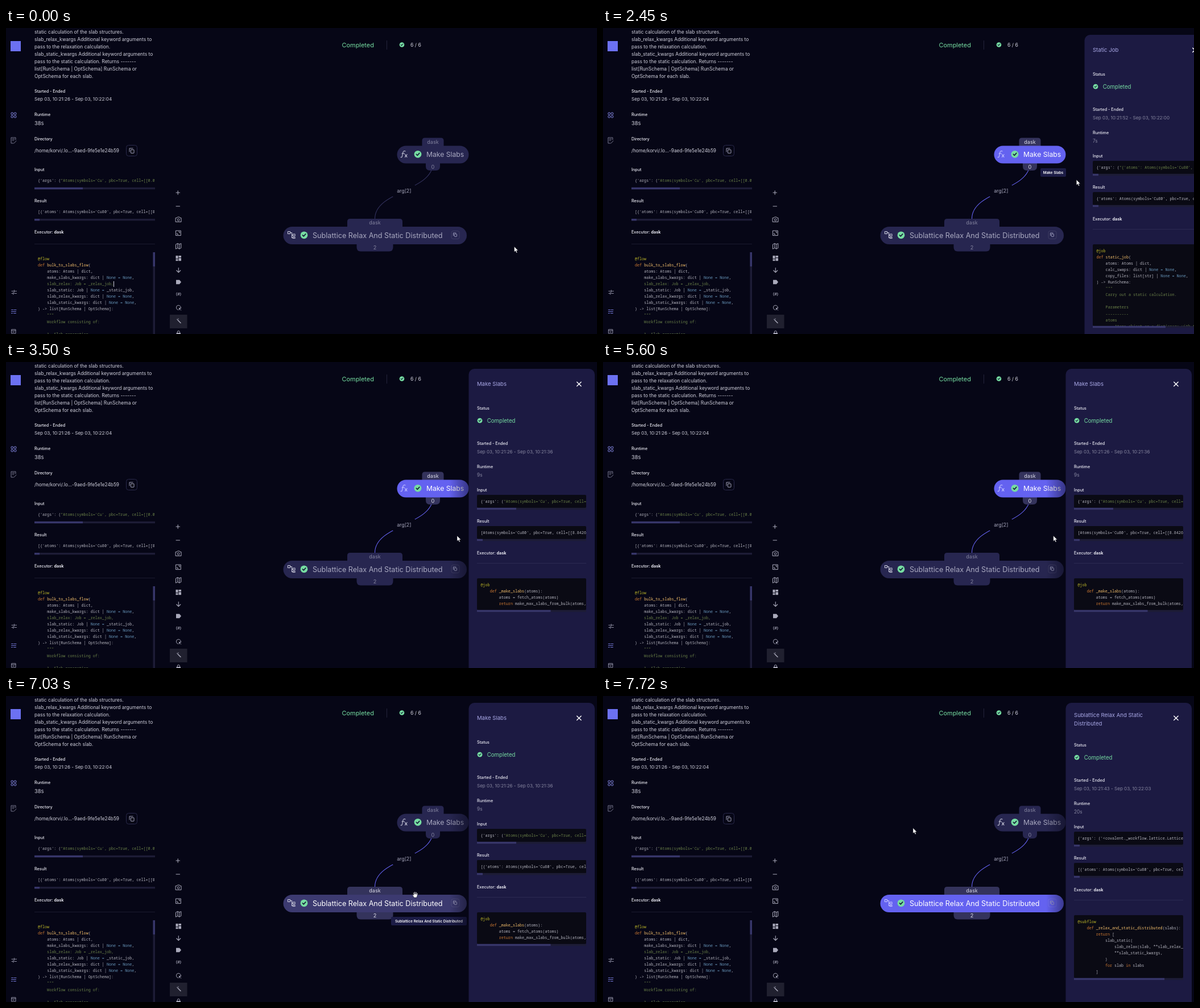
Write an HTML page that moves like this. It is 1039x539 px and loops after 8 s.

```html
<!DOCTYPE html>
<html lang="en">
<head>
<meta charset="utf-8">
<title>Workflow graph</title>
<style>
html, body { margin: 0; width: 100%; height: 100%; overflow: hidden; background: #060616; }
#stage { display: block; position: absolute; left: 0; top: 0; }
text { font-family: Inter, "Open Sans", sans-serif; white-space: pre; }
.mono { font-family: "Noto Sans Mono", "DejaVu Sans Mono", monospace; font-size: 6.73px; }
.line { fill: none; stroke-linecap: round; stroke-linejoin: round; }
</style>
</head>
<body>
<svg id="stage" width="1039" height="539" viewBox="0 0 1039 539"></svg>
<script>
const LOOP = 8000;
const stage = document.getElementById('stage');
const INK = { head: '#eeeef6', body: '#d0d0dc', soft: '#86869f', green: '#76dda2', code: '#b4b4be',
  meta: '#bbb529', key: '#cc7832', name: '#f5c06c', value: '#6897bb', string: '#6a8048' };

function add(parent, tag, attrs, content) {
  const el = document.createElementNS('http://www.w3.org/2000/svg', tag);
  for (const k in attrs) el.setAttribute(k, attrs[k]);
  if (content !== undefined) el.textContent = content;
  return parent.appendChild(el);
}
const group = (parent, attrs = {}) => add(parent, 'g', attrs);
const rect = (parent, x, y, width, height, fill, rx = 0) =>
  add(parent, 'rect', { x, y, width, height, fill, rx });
const path = (parent, d, fill) => add(parent, 'path', { d, fill });
const line = (parent, d, stroke, width = 1) =>
  add(parent, 'path', { d, stroke, 'stroke-width': width, class: 'line' });
const show = (el, on) => el.setAttribute('visibility', on ? 'visible' : 'hidden');
const clipBox = (parent, x, y, width, height) =>
  add(parent, 'svg', { x, y, width, height, overflow: 'hidden' });

// y is the middle of the capitals
function label(parent, x, y, size, str, fill = INK.body, weight = 400, anchor = 'start') {
  return add(parent, 'text', { x, y: y + size * 0.36, 'font-size': size + 'px', fill,
    'font-weight': weight, 'text-anchor': anchor }, str);
}

const TOKENS = [
  ['meta', /^@\w+/], ['string', /^".*/], ['key', /^\b(def|return|for|in)\b/],
  ['value', /^None( =( None)?)?/], ['code', /^(\w+|[^\w"@]+|.)/]
];
function codeLine(parent, x, y, str) {
  const text = add(parent, 'text', { x, y: y + 2.4, class: 'mono', fill: INK.code });
  if (str[0] === '~') {
    add(text, 'tspan', { fill: INK.string }, str.slice(1));
    return;
  }
  let afterDef = false;
  while (str) {
    const [kind, re] = TOKENS.find(([, r]) => r.test(str));
    const word = str.match(re)[0];
    const isName = afterDef && /\w/.test(word);
    add(text, 'tspan', { fill: INK[isName ? 'name' : kind] }, word);
    if (word === 'def') afterDef = true;
    else if (isName) afterDef = false;
    str = str.slice(word.length);
  }
}
const code = (parent, x, y, src) =>
  src.split('\n').forEach((s, i) => s && codeLine(parent, x, y + i * 11.04, s));

function check(parent, x, y, r) {
  add(parent, 'circle', { cx: x, cy: y, r, fill: INK.green });
  line(parent, `M${x - r * .42} ${y}l${r * .3} ${r * .32}l${r * .56} ${-r * .62}`, '#16203a', r * .26);
}
function scrollBar(parent, x, y, width, thumb) {
  rect(parent, x, y, width, 3.4, '#1d1c36');
  rect(parent, x, y, thumb, 3.4, '#37366a');
}
function copyIcon(parent, x, y, s, color) {
  line(parent, `M${x - s} ${y + s * .5}v${-s * 1.5}h${s * 1.5}`, color, .9);
  add(parent, 'rect', { x: x - s * .4, y: y - s * .4, width: s * 1.4, height: s * 1.5,
    rx: .6, fill: 'none', stroke: color, 'stroke-width': .9 });
}

// side navigation
const nav = group(stage);
rect(nav, 8, 23, 18, 18, '#6c71f2');
for (const [x, y] of [[9, 149], [14.3, 149], [9, 154.3], [14.3, 154.3]])
  add(nav, 'rect', { x, y, width: 3.6, height: 3.6, rx: 1.2, fill: 'none', stroke: '#8b8fee' });
line(nav, 'M13 203h-4v-10h8v4M11 195.500h4M11 198h3M14 203l4-4', '#77778e');
line(nav, 'M10 463.500h3M16 463.500h2.500M10 467.500h1.500M14.500 467.500h4', '#8d8da2');
line(nav, 'M14.500 462v3M12.800 466v3', '#8d8da2', 1.3);
line(nav, 'M9.500 496.500h3M14 496.500h4M9.500 499.500h8M9.500 502.500h2M13.500 502.500h4', '#7478d8');
line(nav, 'M10 531h7v7h-7zM10 533h7M12 535.500h2', '#8d8da2');

// left details
const side = clipBox(stage, 0, 0, 262, 539);
['static calculation of the slab structures.', 'slab_relax_kwargs Additional keyword arguments to',
  'pass to the relaxation calculation.', 'slab_static_kwargs Additional keyword arguments to',
  'pass to the static calculation. Returns -------', 'list[RunSchema | OptSchema] RunSchema or',
  'OptSchema for each slab.'].forEach((s, i) => label(side, 50, 7.2 + i * 12.9, 8.45, s));
const heading = (parent, x, y, str) => label(parent, x, y, 7.2, str, INK.head, 500);
function executor(parent, x, y) {
  const t = heading(parent, x, y, 'Executor: ');
  add(t, 'tspan', { 'font-weight': 700 }, 'dask');
}
heading(side, 50, 111.3, 'Started - Ended');
label(side, 50, 125.5, 8.1, 'Sep 03, 10:21:26 - Sep 03, 10:22:04');
heading(side, 50, 152.5, 'Runtime');
label(side, 50, 168, 9.4, '38s');
heading(side, 50, 195.3, 'Directory');
label(side, 50, 216, 8.25, '/home/korvi/.lo...-9aed-9fe5e1e24b59');
add(side, 'rect', { x: 211.5, y: 206.5, width: 19, height: 19, rx: 4, fill: 'none', stroke: '#29294a' });
copyIcon(side, 221, 216, 4, '#b6b6c8');
heading(side, 50, 249.3, 'Input');
codeLine(side, 56, 269, `{'args': ("Atoms(symbols='Cu', pbc=True, cell=[[0.0, 1.8`);
scrollBar(side, 50, 280.8, 212, 85);
heading(side, 50, 304.5, 'Result');
codeLine(side, 56, 324, `[{'atoms': Atoms(symbols='Cu80', pbc=True, cell=[[8.84`);
scrollBar(side, 50, 336, 212, 9);
executor(side, 50, 359.5);
rect(side, 50, 380, 212, 1, '#1a1a2e');
code(side, 56, 406.7, `@flow
def bulk_to_slabs_flow(
    atoms: Atoms | dict,
    make_slabs_kwargs: dict | None = None,
~    slab_relax: Job = _relax_job,
    slab_static: Job | None = _static_job,
    slab_relax_kwargs: dict | None = None,
    slab_static_kwargs: dict | None = None,
) -> list[RunSchema | OptSchema]:
~    """
~    Workflow consisting of:

~    1. Slab generation`);
rect(side, 258.500, 395, 3.5, 144, '#1d1c36');
rect(side, 258.500, 395, 3.5, 25, '#37366a');
const caret = rect(side, 189, 446, 1, 10, '#d0d0dc');

// toolbar
const tools = group(stage);
const TOOL = '#a9a9ba';
rect(tools, 288, 505, 30.500, 24, '#20202f');
line(tools, 'M299 290h6.500M302.200 286.800v6.500M299 314h6.500', TOOL, 1.1);
line(tools, 'M298.500 334.500h2l1-1.500h3.500l1 1.500h2v7h-9.500z', TOOL);
add(tools, 'circle', { cx: 303.2, cy: 337.8, r: 1.9, fill: 'none', stroke: TOOL });
line(tools, 'M298.800 357h8.500v8.500h-8.500zM303.500 359h2v2M300.800 361.500v2h2', TOOL);
line(tools, 'M298.800 381l3-1.500 3 1.500 3-1.500v8l-3 1.500-3-1.500-3 1.500zM301.800 379.500v8M304.800 381v8', TOOL);
[[298.5, 401, 4, 5.3], [303.5, 401, 4.5, 3.3], [298.5, 407.3, 4, 2.9], [303.5, 405.3, 4.5, 4.9]]
  .forEach(([x, y, w, h]) => rect(tools, x, y, w, h, TOOL));
line(tools, 'M303.300 422.500v8M299.800 427l3.500 3.500 3.500-3.500', TOOL, 1.1);
path(tools, 'M299 443.800h6l3 3.700-3 3.700h-6z', TOOL);
label(tools, 303.5, 469, 6.4, '{#}', TOOL, 600, 'middle');
line(tools, 'M302.500 496.500a4 4 0 1 1 4.800-3M304.500 493.500l3 3.500M304.500 496.500v-3h3', TOOL);
line(tools, 'M302 514.500l5 5', TOOL, 1.5);
line(tools, 'M300.500 513.200h1M303 512v.8', TOOL);
line(tools, 'M301.300 537v-1.500a2 2 0 0 1 4 0v1.500', TOOL);
rect(tools, 299.500, 537, 7.5, 3, TOOL);

// run summary
label(stage, 590.5, 30, 10.95, 'Completed', INK.green);
rect(stage, 669, 22, 1, 16, '#23233a');
check(stage, 696, 29.5, 4.3);
label(stage, 711, 30, 8.7, '6 / 6');

// graph
const edge = line(stage, 'M750.500 238C750.500 287 648.500 287 648.500 336', '#34335f', 1.1);
rect(stage, 680, 277, 39, 20, '#060616');
label(stage, 699.8, 287.2, 8.8, 'arg[2]', '#a3a3b8', 400, 'middle');

const LOOK = {
  idle: ['#272650', '#a9a9c0'],
  hover: ['#3c3a70', '#ffffff'],
  picked: ['#6462f0', '#ffffff']
};
function makeNode({ x, y, w, title, size, top, bottom, count, icon }) {
  const g = group(stage);
  const cx = top[0] + top[1] / 2;
  const [tx, tw] = top, [bx, bw] = bottom;
  const tags = [
    path(g, `M${tx} ${y + 1}v-10q0-5 5-5h${tw - 10}q5 0 5 5v10z`),
    path(g, `M${bx} ${y + 30}v6q0 7.500 7 7.500h${bw - 14}q7 0 7-7.500v-6z`)
  ];
  const body = rect(g, x, y, w, 31, '#272650', 15.5);
  const words = [label(g, cx, y - 7, 9, 'dask', '', 400, 'middle'),
    label(g, cx, y + 37, 9.2, count, '', 400, 'middle')];
  const mark = line(g, icon, '#c9c9da', 1.1);
  check(g, x + 36.5, y + 14.8, 6.4);
  const name = label(g, x + 51.500, y + 15.2, size, title);
  const set = (look, lit) => {
    const [fill, ink] = LOOK[look];
    body.setAttribute('fill', fill);
    name.setAttribute('fill', ink);
    mark.setAttribute('stroke', look === 'picked' ? '#c4c3ff' : '#c9c9da');
    tags.forEach(t => t.setAttribute('fill', lit ? '#34335c' : '#272650'));
    words.forEach(t => t.setAttribute('fill', lit ? '#dcdce8' : '#83839e'));
  };
  return { g, set };
}
const slabs = makeNode({ x: 687.5, y: 207.5, w: 126, title: 'Make Slabs', size: 12.15,
  top: [731.5, 38], bottom: [738, 25], count: '0',
  icon: 'M702 217q-3.500-1.500-4.200 2.500l-1.200 6q-.500 3-2.600 2M696 221h4.500M701.500 222.800l3.500 4.500M705 222.800l-3.500 4.500' });
const relax = makeNode({ x: 487.5, y: 350, w: 322.5, title: 'Sublattice Relax And Static Distributed',
  size: 12.62, top: [600, 97], bottom: [616.5, 64], count: '2',
  icon: 'M495.500 358.500h4v4h-4zM499.500 360.500h3v9h2M502.500 365h2M504.500 363h3.500v3.500h-3.500zM504.500 368.500h3.500v2h-3.500z' });
add(relax.g, 'rect', { x: 783, y: 357.5, width: 14, height: 14, rx: 3, fill: 'none',
  stroke: '#ffffff', 'stroke-opacity': .1 });
copyIcon(relax.g, 789.5, 364, 3, '#a5a5c4');

function tooltip(x, y, w, str, size) {
  const g = group(stage);
  rect(g, x, y, w, 15, '#1c1c46', 2);
  label(g, x + w / 2, y + 7.4, size, str, '#ffffff', 600, 'middle');
  return g;
}
const slabsTip = tooltip(769, 247, 45, 'Make Slabs', 6.4);
const relaxTip = tooltip(677, 389, 133, 'Sublattice Relax And Static Distributed', 6.42);

// sliding panel, drawn at its resting place
const defs = add(stage, 'defs', {});
const fade = add(defs, 'linearGradient', { id: 'fade' });
add(fade, 'stop', { offset: 0, 'stop-color': '#060616', 'stop-opacity': 0 });
add(fade, 'stop', { offset: 1, 'stop-color': '#060616', 'stop-opacity': .5 });
const panel = group(stage);
rect(panel, 779, 12, 35, 527, 'url(#fade)');
rect(panel, 813.5, 12, 221.5, 560, '#1c1a42', 10);
line(panel, 'M1003.700 35.200l7.400 7.400M1011.100 35.200l-7.400 7.400', '#ffffff', 1.4);

function codeBox(parent, y, h, thumb, src, textY) {
  const box = clipBox(parent, 828, y, 192, h);
  rect(box, 0, 0, 192, h, '#0a0a14', 2);
  code(box, 6.5, textY, src);
  scrollBar(parent, 828, y + h - .2, 192, thumb);
  return box;
}
function sheet({ title, dates, runtime, input, inputThumb, result, src, rows, thumb }) {
  const g = group(panel);
  const dy = title.length > 1 ? 5 : 0;
  title.forEach((s, i) => label(g, 828, 39 - dy + i * 14.5, 9.55, s, '#a9a8e6'));
  const b = group(g, { transform: `translate(0 ${dy})` });
  heading(b, 828, 81, 'Status');
  check(b, 833, 103.2, 4.4);
  label(b, 845.8, 104, 9.65, 'Completed', INK.green);
  heading(b, 828, 143.5, 'Started - Ended');
  label(b, 828, 157.8, 8.05, dates, INK.soft);
  heading(b, 828, 184.7, 'Runtime');
  label(b, 828, 199, 8.3, runtime, INK.soft);
  heading(b, 828, 225.7, 'Input');
  codeBox(b, 234, 23, inputThumb, input, 11.3);
  heading(b, 828, 280.7, 'Result');
  codeBox(b, 289, 23, 10, result, 11.3);
  executor(b, 828, 336);
  rect(b, 828, 354, 192, 1, '#2b2a52');
  codeBox(b, 381, rows, thumb, src, 11.7);
  return g;
}
const jobSheet = sheet({
  title: ['Static Job'], dates: 'Sep 03, 10:21:52 - Sep 03, 10:22:00', runtime: '7s',
  input: `{'args': ("{'atoms': Atoms(symbols='Cu80', pbc=True, cell`, inputThumb: 10,
  result: `{'atoms': Atoms(symbols='Cu80', pbc=True, cell=[[8.8426`,
  rows: 144, thumb: 128, src: `@job
def static_job(
    atoms: Atoms | dict,
    calc_swaps: dict | None = None,
    copy_files: list[str] | None = None,
) -> RunSchema:
~    """
~    Carry out a static calculation.

~    Parameters
~    ----------
~    atoms
~        Atoms object or a dictionary with the key`
});
const slabsSheet = sheet({
  title: ['Make Slabs'], dates: 'Sep 03, 10:21:26 - Sep 03, 10:21:36', runtime: '9s',
  input: `{'args': ("Atoms(symbols='Cu', pbc=True, cell=[[0.0`, inputThumb: 69,
  result: `[Atoms(symbols='Cu80', pbc=True, cell=[[8.8426, 0.0`,
  rows: 56, thumb: 129.5, src: `@job
    def _make_slabs(atoms):
        atoms = fetch_atoms(atoms)
        return make_max_slabs_from_bulk(atoms, **make`
});
const atomsList = `[{'atoms': Atoms(symbols='Cu80', pbc=True, cell=[[8.84`;
const newResult = group(panel);
codeBox(newResult, 289, 23, 10, atomsList, 11.3);
const relaxSheet = sheet({
  title: ['Sublattice Relax And Static', 'Distributed'],
  dates: 'Sep 03, 10:21:43 - Sep 03, 10:22:03', runtime: '20s',
  input: `{'args': ('<covalent._workflow.lattice.Lattice object`, inputThumb: 10,
  result: atomsList, rows: 111, thumb: 159, src: `@subflow
    def _relax_and_static_distributed(slabs):
        return [
            slab_static(
                slab_relax(slab, **slab_relax_kwargs),
                **slab_static_kwargs,
            )
            for slab in slabs
        ]`
});

// pointer: arrow tip or hand centre sits at the origin
const pointer = group(stage);
const click = add(pointer, 'circle', { cx: .5, cy: .5, r: 7.4, fill: '#b5ad16' });
const arrow = path(pointer, 'M0 0v9.600l2.200-2 1.600 3.500 1.600-.700-1.600-3.400h3z', '#ffffff');
const hand = path(pointer, 'M-2.500 5l-2.700-4.200q0-1.300 1.400-.700l.8.8-1-4.300q.8-1.100 1.500 0l.8 2.700-.3-4q.8-1 1.500 0l.4 3.900.7-3.500q.9-.800 1.400.2l-.4 3.800 1-2.400q1-.600 1.300.4l-1 4.300-1.200 3z', '#ffffff');
for (const el of [arrow, hand]) {
  el.setAttribute('stroke', '#10101c');
  el.setAttribute('stroke-width', .5);
}

const ROUTE = [
  [640, 893.5, 385], [760, 884, 366], [1000, 846, 300], [1200, 812, 250], [1410, 797, 231.5],
  [1560, 796, 231], [2260, 796, 231], [2340, 807, 242], [2450, 832, 267], [2650, 890, 304],
  [2850, 933, 321], [3040, 948, 325], [3100, 934, 324], [3250, 852, 312], [3400, 785.5, 303.5],
  [3500, 793, 306], [5550, 793, 306], [5600, 791.8, 306], [5800, 776, 312], [6050, 752, 331],
  [6250, 735, 352], [6390, 727, 354], [6740, 720, 350], [7170, 720, 350], [7280, 696, 333],
  [7450, 622, 284], [7600, 563, 247], [7720, 545, 232.5]
];
function pointerAt(t) {
  const i = ROUTE.findIndex(k => k[0] > t);
  if (i === 0) return ROUTE[0].slice(1);
  if (i < 0) return ROUTE[ROUTE.length - 1].slice(1);
  const [t0, x0, y0] = ROUTE[i - 1], [t1, x1, y1] = ROUTE[i];
  const p = (t - t0) / (t1 - t0);
  return [x0 + (x1 - x0) * p, y0 + (y1 - y0) * p];
}

// cubic-bezier(0, 0, .2, 1)
function easeOut(p) {
  if (p <= 0) return 0;
  if (p >= 1) return 1;
  let lo = 0, hi = 1;
  for (let i = 0; i < 24; i++) {
    const s = (lo + hi) / 2;
    if (.6 * (1 - s) * s * s + s ** 3 < p) lo = s; else hi = s;
  }
  return 3 * (1 - lo) * lo * lo + lo ** 3;
}

function draw(t) {
  const during = (a, b = LOOP) => t >= a && t < b;
  show(caret, t < 100);

  slabs.set(during(2310, 6740) ? 'picked' : during(1350, 2310) ? 'hover' : 'idle', during(2310, 6740));
  relax.set(during(7260) ? 'picked' : during(6250) ? 'hover' : 'idle', during(6740));
  edge.setAttribute('stroke', during(2310) ? '#6462f0' : '#34335f');
  show(slabsTip, during(1460, 2540));
  show(relaxTip, during(6440, 7330));

  show(panel, during(2330));
  panel.setAttribute('transform', `translate(${225 * (1 - easeOut((t - 2334) / 225))} 0)`);
  const visible = el => el.setAttribute('display', 'inline');
  [jobSheet, slabsSheet, newResult, relaxSheet].forEach(el => el.setAttribute('display', 'none'));
  if (t < 2620) visible(jobSheet);
  else if (t < 7380) visible(slabsSheet);
  else visible(relaxSheet);
  if (during(7030, 7380)) visible(newResult);

  const [x, y] = pointerAt(t);
  const grabbing = during(1350, 2310) || during(6250, 7260);
  pointer.setAttribute('transform', `translate(${x} ${y})`);
  show(arrow, !grabbing);
  show(hand, grabbing);
  show(click, during(1710, 2010) || during(6540, 6740));
}

const start = performance.now();
function tick() {
  draw((performance.now() - start) % LOOP);
  requestAnimationFrame(tick);
}
draw(0);
requestAnimationFrame(tick);
</script>
</body>
</html>
```
